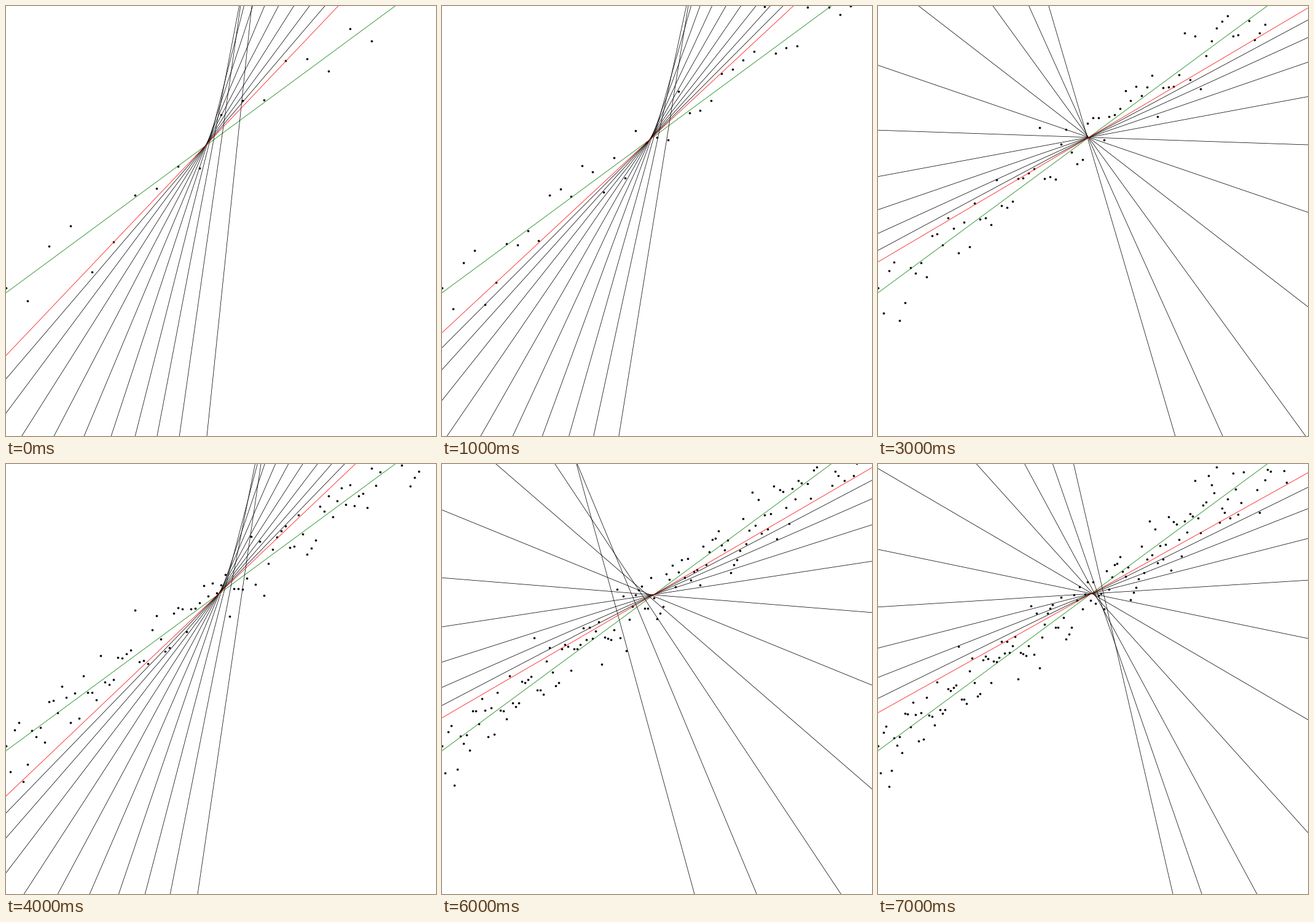
These frames come from a looping animation (700 by 700 pixels, 8 s). A matplotlib script:

```python
import numpy as np
import matplotlib.pyplot as plt
from matplotlib.animation import FuncAnimation
from matplotlib.collections import LineCollection

SIZE, DPI = 700, 100
HALF = SIZE / 2
PX = 72 / DPI                        # one pixel in points
FRAMES, POINTS_PER_FRAME = 8, 20
RATE, STEPS, LINES = 0.05, 20, 10

# Slopes and intercepts in [-1, 1] coordinates, y upwards
TREND = np.array([0.75, 0.407])
BEST = np.array([0.737, 0.403])
STARTS = [(9.59, -0.37), (6.2, 0.1), (-2.84, 0.189), (-3.4, 0.3),
          (6.8, -0.262), (8.05, -0.632), (-3.646, -0.365), (-4.334, 0.61)]

NOISE = np.random.default_rng(42).normal(0, 0.1, FRAMES * POINTS_PER_FRAME)


def to_px(x, y):
    return (x + 1) * HALF, (1 - y) * HALF


def descend(x, start):
    """Lines met by gradient descent on the way to the best fit."""
    a = np.column_stack([x, np.ones_like(x)])
    step = np.eye(2) - RATE * a.T @ a / len(x)
    counts = [STEPS * k for k in range(LINES)] + [STEPS * LINES - 1]
    return [BEST + np.linalg.matrix_power(step, c) @ (start - BEST)
            for c in counts]


def segment(line):
    ends = np.array([-1.2, 1.2])
    return np.column_stack(to_px(ends, np.polyval(line, ends)))


fig = plt.figure(figsize=(SIZE / DPI, SIZE / DPI), dpi=DPI, facecolor="white")
ax = fig.add_axes([0, 0, 1, 1])
ax.set_xlim(0, SIZE)
ax.set_ylim(SIZE, 0)
ax.axis("off")

lines = LineCollection([], linewidths=0.75 * PX, zorder=2,
                       colors=["green"] + ["black"] * LINES + ["red"])
ax.add_collection(lines, autolim=False)
dots, = ax.plot([], [], "o", color="black", ms=3.6 * PX, mew=0, zorder=1)


def draw(frame):
    n = POINTS_PER_FRAME * (frame + 1)
    x = np.linspace(-1, 1, n, endpoint=False)
    dots.set_data(*to_px(x, np.polyval(TREND, x) + NOISE[:n]))
    path = descend(x, np.array(STARTS[frame]))
    lines.set_segments([segment(line) for line in [BEST] + path])
    return lines, dots


anim = FuncAnimation(fig, draw, frames=FRAMES, interval=1000, repeat=True,
                     repeat_delay=0, blit=False)
plt.show()
```
